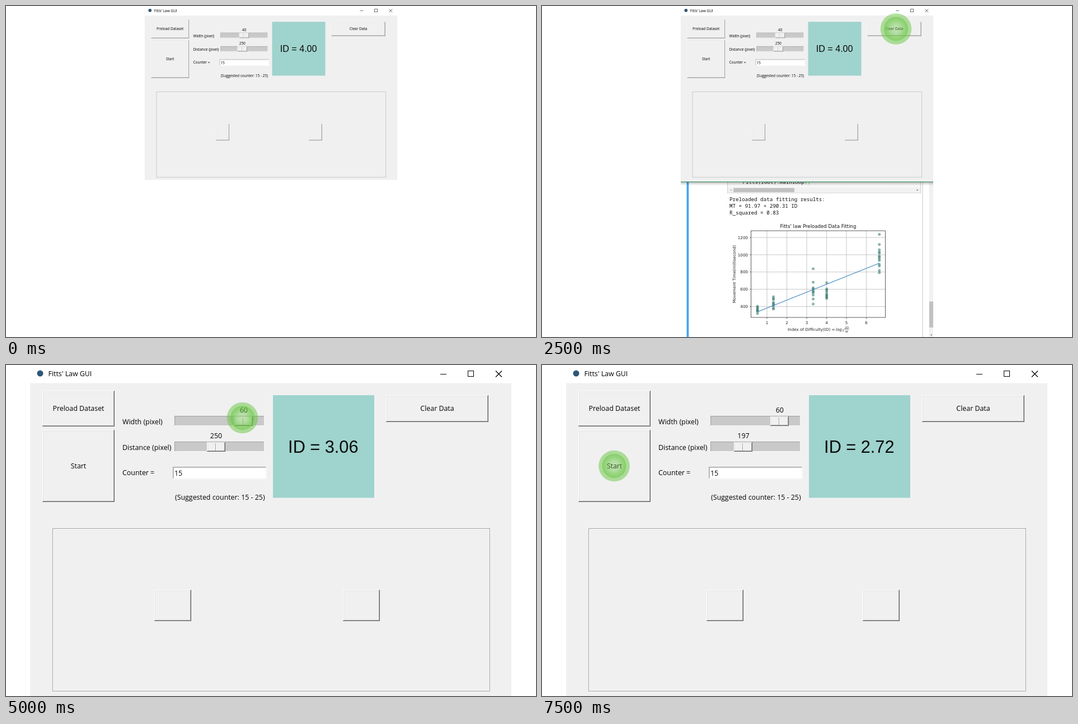
Recreate the animation shown at these times as an HTML page with a canvas. Size 947 px wide and 592 px high, loop 8 s.

```html
<!DOCTYPE html>
<html lang="en">
<head>
<meta charset="utf-8">
<title>Fitts' Law GUI</title>
<style>
html, body { margin: 0; width: 100%; height: 100%; overflow: hidden; background: #fff; }
canvas { display: block; }
</style>
</head>
<body>
<canvas id="stage" width="947" height="592"></canvas>
<script>
const ctx = document.getElementById('stage').getContext('2d');
const LOOP = 8000;
const UI = '"Open Sans", sans-serif';
const MONO = '"Noto Sans Mono", monospace';
const PLOT = '"DejaVu Sans", sans-serif';

// Each state takes effect at its time and keeps the values it does not name.
const timeline = [
  { at: 0, zoomed: false, plot: false, width: 40, distance: 250, id: '4.00', click: null },
  { at: 1000, click: [291.5, 40] },
  { at: 1500, click: null, plot: true },
  { at: 2500, click: [632.5, 41] },
  { at: 3000, click: null, plot: false },
  { at: 3500, zoomed: true },
  { at: 4500, click: [382, 94] },
  { at: 5000, click: [422.5, 94.5], width: 60, id: '3.06' },
  { at: 5500, click: null },
  { at: 6000, click: [375, 143.5] },
  { at: 6500, click: [360.5, 143.5], distance: 197, id: '2.72' },
  { at: 7000, click: null },
  { at: 7500, click: [129, 180.5] }
];

function box(x, y, w, h, color) {
  ctx.fillStyle = color;
  ctx.fillRect(x, y, w, h);
}

function text(str, x, y, font, color = '#000', align = 'left') {
  ctx.font = font;
  ctx.fillStyle = color;
  ctx.textAlign = align;
  ctx.fillText(str, x, y);
}

function line(points, color, width = 1) {
  ctx.strokeStyle = color;
  ctx.lineWidth = width;
  ctx.beginPath();
  points.forEach(([x, y]) => ctx.lineTo(x, y));
  ctx.stroke();
}

function disc(x, y, r, color) {
  ctx.fillStyle = color;
  ctx.beginPath();
  ctx.arc(x, y, r, 0, Math.PI * 2);
  ctx.fill();
}

const label = (str, x, y, align) => text(str, x, y + 4.4, `12.4px ${UI}`, '#000', align);

function edges(x, y, w, h, topLeft, bottomRight) {
  box(x, y, w, 1, topLeft);
  box(x, y, 1, h, topLeft);
  box(x, y + h - 1, w, 1, bottomRight);
  box(x + w - 1, y, 1, h, bottomRight);
}

function raised(x, y, w, h) {
  box(x, y, w, h, '#f0f0f0');
  edges(x, y, w, h, '#fff', '#696969');
  edges(x + 1, y + 1, w - 2, h - 2, '#e3e3e3', '#a0a0a0');
}

function button(str, x, y, w, h) {
  raised(x, y, w, h);
  label(str, x + w / 2, y + h / 2, 'center');
}

function slider(value, center, y) {
  box(301, y, 161, 18, '#c9c9c9');
  edges(301, y, 161, 18, '#a0a0a0', '#f6f6f6');
  const left = Math.round(center - 16.5);
  raised(left, y + 1, 33, 17);
  box(left + 15, y + 3, 1, 13, '#a0a0a0');
  box(left + 16, y + 3, 1, 13, '#fff');
  label(value, center, y - 10, 'center');
}

function titleBar() {
  box(43, 0, 860, 32.5, '#fff');
  disc(61, 15, 5.5, '#2f5675');
  label('Fitts\' Law GUI', 75.5, 15.7);
  box(776, 16, 11, 1, '#000');
  edges(825, 10, 11, 11, '#000', '#000');
  line([[875, 10.5], [886, 21.5]], '#000', 1.2);
  line([[886, 10.5], [875, 21.5]], '#000', 1.2);
}

function appWindow({ width, distance, id }, height) {
  box(43, 0, 860, height, '#f0f0f0');
  titleBar();
  button('Preload Dataset', 65, 46, 129, 64);
  button('Start', 65, 116, 129, 129);
  button('Clear Data', 679, 54, 183, 48);

  label('Width (pixel)', 208, 102);
  label('Distance (pixel)', 208, 148);
  label('Counter =', 208, 192.5);
  slider(width, 381.8 + (width - 40) * 2.15, 91);
  slider(distance, 375.5 + (distance - 250) * 0.2925, 137);

  box(298, 182, 168, 22, '#fff');
  edges(298, 182, 168, 22, '#a0a0a0', '#fff');
  edges(299, 183, 166, 20, '#cfcfcf', '#f3f3f3');
  label('15', 301, 193.5);
  label('(Suggested counter: 15 - 25)', 302, 237);

  box(477, 54, 181, 183.5, '#9fd3cd');
  text(`ID = ${id}`, 566.8, 157, '30.7px "Liberation Sans", Arial, sans-serif', '#0a0a0a', 'center');

  edges(84, 293, 782, 292, '#fff', '#fff');
  edges(83, 292, 782, 292, '#a0a0a0', '#a0a0a0');

  const unit = 1.0875, middle = 465.8;
  const gap = distance * unit / 2;
  const size = Math.round(width * unit) + 1;
  raised(Math.round(middle - gap) + 1 - size, 402, size, 56);
  raised(Math.round(middle + gap), 402, size, 56);
}

function arrow(x, y, dx, dy, color) {
  ctx.fillStyle = color;
  ctx.beginPath();
  ctx.moveTo(x + dx, y + dy);
  ctx.lineTo(x - dx + dy, y - dy + dx);
  ctx.lineTo(x - dx - dy, y - dy - dx);
  ctx.fill();
}

const samples = [
  [385, [537, 539, 541, 543, 545, 546, 550]],
  [413.5, [520, 523, 525, 530, 532, 534, 536, 540, 542]],
  [484.5, [470, 494, 504, 506, 509, 511, 513, 517, 524, 533]],
  [508.7, [495, 506, 508, 511, 515, 517, 519, 521, 523]],
  [602.7, [408.5, 426.5, 436, 440, 442, 447, 449, 452, 455, 462, 465, 473, 477]]
];

function chart() {
  const small = `7.16px ${PLOT}`;
  const left = 373.5, right = 613.5, top = 402, bottom = 557;
  for (let v = 1; v <= 6; v++) {
    const x = 366.5 + 35.5 * v;
    line([[x, top], [x, bottom]], '#b0b0b0', 0.7);
    line([[x, bottom], [x, bottom + 2.5]], '#222', 0.7);
    text(v, x, 568.5, small, '#222', 'center');
  }
  for (let v = 400; v <= 1200; v += 200) {
    const y = 537.5 - (v - 400) * 0.1544;
    line([[left, y], [right, y]], '#b0b0b0', 0.7);
    line([[left - 2.5, y], [left, y]], '#222', 0.7);
    text(v, 368, y + 2.7, small, '#222', 'right');
  }
  for (const [x, ys] of samples) {
    for (const y of ys) disc(x, y, 2.5, 'rgba(48,116,106,0.55)');
  }
  line([[385, 547], [602.7, 460]], '#3d88c0', 1.3);
  ctx.strokeStyle = '#333';
  ctx.lineWidth = 0.8;
  ctx.strokeRect(left, top, right - left, bottom - top);

  text('Fitts\' law Preloaded Data Fitting', 493.5, 397, `8.6px ${PLOT}`, '#111', 'center');
  ctx.save();
  ctx.translate(346, 479.5);
  ctx.rotate(-Math.PI / 2);
  text('Movement Time(millisecond)', 0, 0, small, '#222', 'center');
  ctx.restore();

  text('Index of Difficulty(ID) =', 439, 580.5, small, '#222');
  text('log', 525, 580.5, `italic ${small}`, '#222');
  text('2', 536.5, 582, `5px ${PLOT}`, '#222');
  text('2D', 544.5, 576.8, `italic 5px ${PLOT}`, '#222', 'center');
  line([[540, 578], [549, 578]], '#222', 0.6);
  text('W', 544.5, 583.5, `italic 5px ${PLOT}`, '#222', 'center');
}

function notebook() {
  const mono = `9.2px ${MONO}`;
  box(258.5, 315, 3.7, 277, '#42a5f5');
  box(679.5, 315, 1, 277, '#c4c4c4');

  box(331, 300, 346, 35, '#cfcfcf');
  box(332, 300, 344, 34.3, '#f7f7f7');
  text('Fitts(root).mainloop', 358.5, 318.4, mono, '#222');
  text('()', 469, 318.4, mono, '#3c3');
  box(332, 325, 344, 9, '#f1f1f1');
  box(342, 325.5, 109, 7.5, '#c1c1c1');
  arrow(337.5, 329.3, -1.2, 0, '#a3a3a3');
  arrow(671, 329.3, 1.2, 0, '#505050');

  text('Preloaded data fitting results:', 335, 349, mono, '#111');
  text('MT = 91.97 + 290.31 ID', 335, 361, mono, '#111');
  text('R_squared = 0.83', 335, 373, mono, '#111');
  chart();

  box(691.5, 315, 7.5, 277, '#f1f1f1');
  box(692, 528.5, 7, 46.5, '#c1c1c1');
  arrow(695.7, 588.7, 0, 1.2, '#505050');
}

function windowShadow() {
  const shade = ctx.createLinearGradient(0, 315, 0, 321);
  shade.addColorStop(0, 'rgba(0,0,0,0.25)');
  shade.addColorStop(1, 'rgba(0,0,0,0)');
  box(248, 315, 451, 6, shade);
  box(248, 314, 451, 1, '#2f9159');
}

function clickMark([x, y]) {
  const glow = ctx.createRadialGradient(x, y, 0, x, y, 28);
  const green = a => `rgba(104,198,66,${a})`;
  [[0, 0.32], [0.3, 0.45], [0.5, 0.62], [0.75, 0.78], [0.78, 0.5], [1, 0.5]]
    .forEach(([stop, alpha]) => glow.addColorStop(stop, green(alpha)));
  disc(x, y, 27.8, glow);
}

function draw(time) {
  const state = Object.assign({}, ...timeline.filter(step => step.at <= time));
  box(0, 0, 947, 592, '#fff');
  if (state.plot) notebook();

  ctx.save();
  if (!state.zoomed) {
    ctx.translate(247.8, 0);
    ctx.scale(0.5247, 0.5247);
    ctx.translate(-43, 0);
  }
  appWindow(state, state.plot ? 600 : 592.7);
  ctx.restore();

  if (state.plot) windowShadow();
  if (state.click) clickMark(state.click);
}

function tick() {
  draw(performance.now() % LOOP);
  requestAnimationFrame(tick);
}
tick();
</script>
</body>
</html>
```
